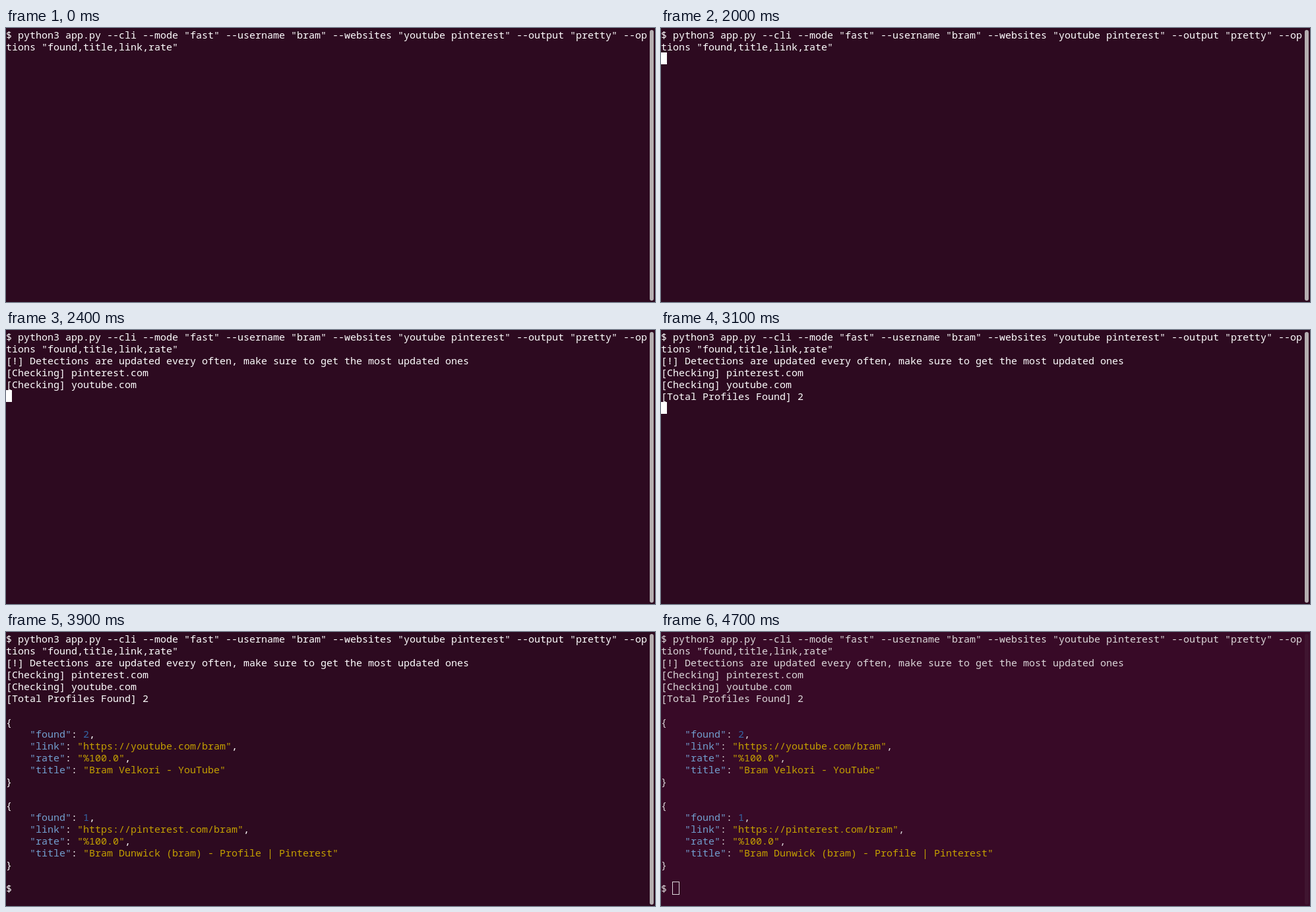
Write an HTML page that moves like this. It is 984x415 px and loops after 4800 ms.

```html
<!DOCTYPE html>
<html lang="en">
<head>
<meta charset="utf-8">
<title>Terminal</title>
<style>
  html, body { margin: 0; width: 100%; height: 100%; overflow: hidden; }
  body { background: #2d0a20; }
  #term {
    position: relative; width: 984px; height: 415px; overflow: hidden;
    background: #2d0a20; color: #fff;
    font: 15px/18px "Noto Sans Mono", "DejaVu Sans Mono", monospace;
    font-variant-ligatures: none;
  }
  .row { position: absolute; left: 0; height: 18px; white-space: pre; }
  .key { color: #729fcf; }
  .num { color: #3465a4; }
  .str { color: #c4a000; }
  #cursor { position: absolute; width: 9px; height: 18px; background: #fff; }
  #cursor.hollow { margin: -1px; border: 1px solid #fff; background: none; }
  #bar {
    position: absolute; left: 976px; top: 3px; width: 6px; height: 410px;
    border-radius: 3px; background: #b5aeb1;
  }
  #term.blurred { background: #380a27; color: #dcd8da; }
  .blurred #cursor.hollow { border-color: #dcd8da; }
  .blurred #bar { background: #3f1530; }
</style>
</head>
<body>
<div id="term"><div id="cursor"></div><div id="bar"></div></div>
<script>
const LOOP = 4800, COL = 9, LINE = 18, TOP = 1;
const term = document.getElementById("term");
const cursor = document.getElementById("cursor");

const tag = (kind, text) => `<span class="${kind}">${text}</span>`;
const field = (name, kind, value, end = ",") =>
  `    ${tag("key", `"${name}"`)}: ${tag(kind, value)}${end}`;
const profile = (found, link, title) => [
  "{",
  field("found", "num", found),
  field("link", "str", `"${link}"`),
  field("rate", "str", '"%100.0"'),
  field("title", "str", `"${title}"`, ""),
  "}",
  ""
];

const lines = [
  '$ python3 app.py --cli --mode "fast" --username "bram" --websites "youtube pinterest" --output "pretty" --op',
  'tions "found,title,link,rate"',
  "[!] Detections are updated every often, make sure to get the most updated ones",
  "[Checking] pinterest.com",
  "[Checking] youtube.com",
  "[Total Profiles Found] 2",
  "",
  ...profile(2, "https://youtube.com/bram", "Bram Velkori - YouTube"),
  ...profile(1, "https://pinterest.com/bram", "Bram Dunwick (bram) - Profile | Pinterest"),
  "$ "
];

const rows = lines.map((html, i) => {
  const row = document.createElement("div");
  row.className = "row";
  row.style.top = TOP + i * LINE + "px";
  row.innerHTML = html;
  term.insertBefore(row, cursor);
  return row;
});

// start time, visible lines, cursor column, cursor row, cursor style
const steps = [
  [0, 2, 29, 1, "off"],
  [500, 2, 29, 1, "solid"],
  [1100, 2, 29, 1, "off"],
  [1700, 2, 29, 1, "solid"],
  [2000, 2, 0, 2, "solid"],
  [2100, 3, 0, 3, "solid"],
  [2400, 5, 0, 5, "solid"],
  [3100, 6, 0, 6, "solid"],
  [3200, 21, 0, 21, "solid"],
  [3500, 22, 2, 21, "solid"],
  [3900, 22, 2, 21, "off"],
  [4500, 22, 2, 21, "solid"],
  [4600, 22, 2, 21, "hollow"]
];
const BLUR_AT = 4700;

function draw(t) {
  const [, count, col, line, style] = steps.findLast(step => step[0] <= t);
  rows.forEach((row, i) => { row.style.visibility = i < count ? "visible" : "hidden"; });
  cursor.style.left = col * COL + "px";
  cursor.style.top = TOP + line * LINE + "px";
  cursor.style.visibility = style === "off" ? "hidden" : "visible";
  cursor.className = style;
  term.className = t >= BLUR_AT ? "blurred" : "";
}

const start = performance.now();
function tick() {
  draw((performance.now() - start) % LOOP);
  requestAnimationFrame(tick);
}
tick();
</script>
</body>
</html>
```
